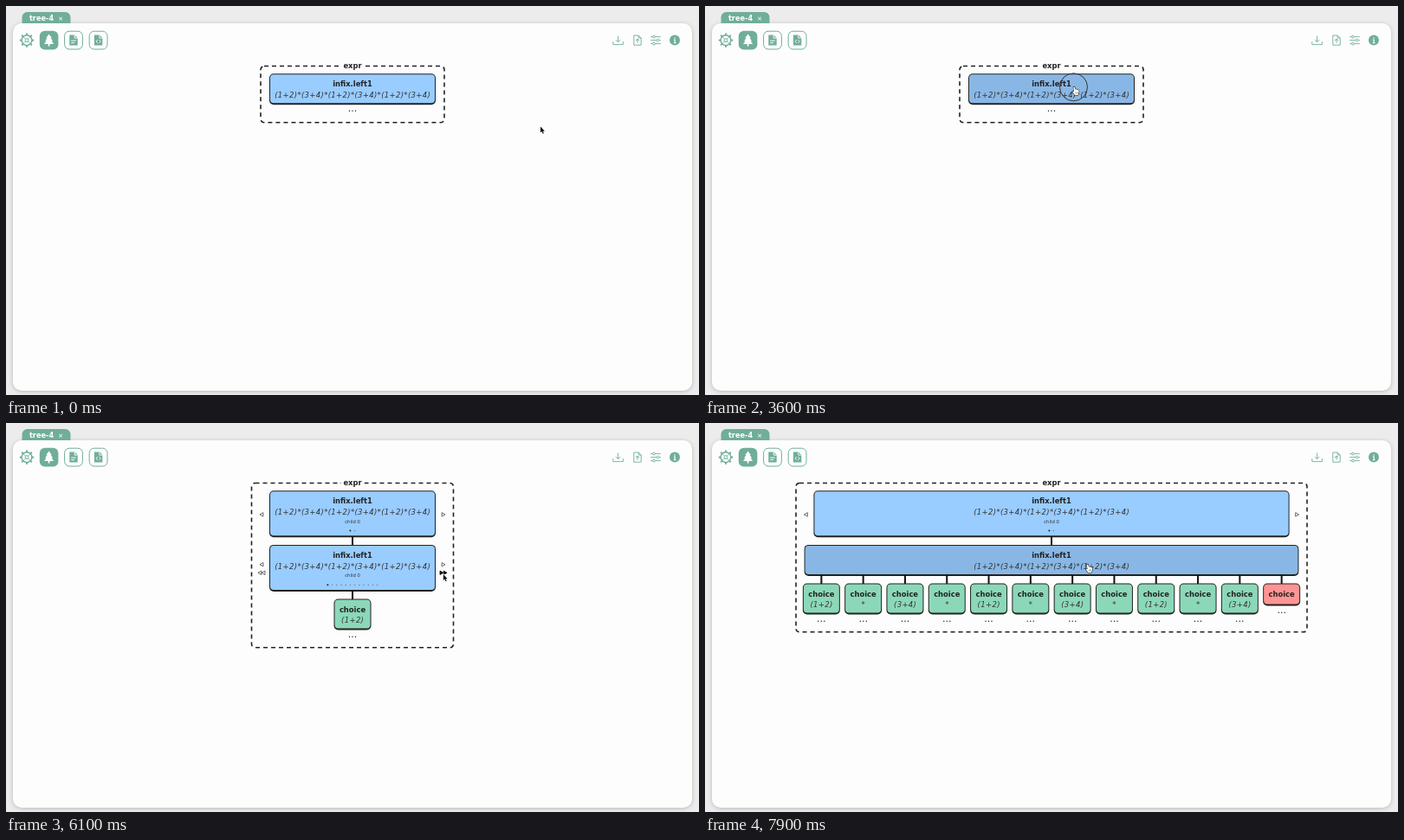
An HTML page with a canvas that plays this animation: 800 by 450 pixels, repeating every 8000 ms.

```html
<!DOCTYPE html>
<html lang="en">
<head>
<meta charset="utf-8">
<title>Parse tree viewer</title>
<style>
html, body { margin: 0; width: 100%; height: 100%; overflow: hidden; background: #ececec; }
canvas { display: block; }
</style>
</head>
<body>
<canvas id="stage" width="800" height="450"></canvas>
<script>
const c = document.getElementById('stage').getContext('2d');
const GREEN = '#70ae99', PAPER = '#fdfdfd', INK = '#222';
const BLUE = '#99ccff', MINT = '#8bd8b9', RED = '#ff9494';
const EXPR = Array(3).fill('(1+2)*(3+4)').join('*');
const LOOP = 8000, TICK = 100, GAP = 8.6;

// Tree state from each time on: chosen child of the outer and of the inner node.
const states = [
  [0, {}],
  [1000, { outer: 0 }],
  [1800, { outer: 1 }],
  [2900, {}],
  [3700, { outer: 0 }],
  [4600, { outer: 0, inner: 0 }],
  [6300, { outer: 0, inner: 5 }],
  [6800, { outer: 0, inner: 10 }],
  [7700, { outer: 0, all: true }]
];
const clicks = [900, 1700, 2800, 3600, 4500, 6200, 6700, 7600];

// Pointer moves: start, end, x, y
const moves = [
  [200, 850, 425.5, 93.5],
  [1100, 1500, 504.8, 105],
  [2400, 2800, 425.5, 93.5],
  [3700, 4400, 422.7, 156],
  [5000, 5800, 504.8, 175],
  [6900, 7500, 441, 163.5]
];

function pointerAt(t) {
  let x = 617, y = 139.5;
  for (const [start, end, toX, toY] of moves) {
    const k = Math.min(1, Math.max(0, (t - start) / (end - start)));
    const e = k * k * (3 - 2 * k);
    x += (toX - x) * e;
    y += (toY - y) * e;
  }
  return { x, y };
}

function box(x, y, w, h, r, fill) {
  c.beginPath();
  c.roundRect(x, y, w, h, r);
  c.fillStyle = fill;
  c.fill();
}

function text(s, x, y, font, color = INK, spacing = 0) {
  c.font = font + ' "DejaVu Sans", Verdana, sans-serif';
  c.textAlign = 'center';
  c.letterSpacing = spacing + 'px';
  c.fillStyle = color;
  c.fillText(s, x + spacing / 2, y);
}

function trace(d, color, width = 1) {
  c.strokeStyle = color;
  c.lineWidth = width;
  c.stroke(new Path2D(d));
}

function shape(d, color) {
  c.fillStyle = color;
  c.fill(new Path2D(d));
}

function at(x, y, draw) {
  c.save();
  c.translate(x, y);
  draw();
  c.restore();
}

function disc(x, y, r, color) {
  c.beginPath();
  c.arc(x, y, r, 0, 7);
  c.fillStyle = color;
  c.fill();
}

function ring(x, y, r, color, width) {
  c.beginPath();
  c.arc(x, y, r, 0, 7);
  c.strokeStyle = color;
  c.lineWidth = width;
  c.stroke();
}

function gear() {
  ring(0, 0, 5.9, GREEN, 1.4);
  ring(0, 0, 1.9, GREEN, 1);
  for (let i = 0; i < 8; i++) {
    c.save();
    c.rotate(i * Math.PI / 4);
    trace('M6 0H8.2', GREEN, 2);
    if (i % 2) trace('M2 0H6', GREEN, .8);
    c.restore();
  }
}

function button(x) {
  c.beginPath();
  c.roundRect(x - 10.4, 29.2, 20.8, 20.8, 5.5);
  c.strokeStyle = GREEN;
  c.lineWidth = 1;
  c.stroke();
}

const PAGE = 'M-4.7 -6H1.4L4.7 -2.7V6H-4.7Z';

function chrome() {
  c.fillStyle = '#ececec';
  c.fillRect(0, 0, 800, 450);
  c.save();
  c.shadowColor = 'rgba(0,0,0,.22)';
  c.shadowBlur = 5;
  c.shadowOffsetY = 1;
  box(8, 20, 784, 425, 10, PAPER);
  c.restore();
  box(18.5, 7, 56, 13, [6, 6, 0, 0], GREEN);
  text('tree-4', 41, 17, 'bold 8.2px', '#fff');
  text('×', 63.2, 17, 'bold 7.5px', '#e4f1ec');

  at(24, 39.6, gear);
  box(38.8, 28.8, 21.6, 21.6, 6, GREEN);
  at(49.6, 39.6, () => shape('M0 -7L3.3 -2.7H2L4.5 .8H3L5.6 4.5H.9V7H-.9V4.5H-5.6L-3 .8H-4.5L-2 -2.7H-3.3Z', '#fff'));
  button(78);
  at(78, 39.6, () => {
    shape(PAGE, GREEN);
    trace('M1.2 -6V-2.5H4.7M-2.8 .5H2.8M-2.8 3H1.2', PAPER, 1);
  });
  button(106.6);
  at(106.6, 39.6, () => {
    shape(PAGE, GREEN);
    trace('M1.2 -6V-2.5H4.7M-.8 -.6L-2.6 1.3L-.8 3.2M.8 -.6L2.6 1.3L.8 3.2', PAPER, .9);
  });

  at(706.6, 39.6, () => trace('M-5.8 1.5V5H5.8V1.5M0 -5V2M-2.6 -.5L0 2.1L2.6 -.5', GREEN, .9));
  at(729, 39.6, () => {
    trace('M-4.2 -5.6H1.2L4.2 -2.6V5.6H-4.2ZM1.2 -5.6V-2.6H4.2', GREEN, .9);
    trace('M0 3V-1.4M-1.9 .4L0 -1.5L1.9 .4', GREEN, 1);
  });
  at(750, 39.6, () => {
    trace('M-5.8 -4H5.8M-5.8 0H5.8M-5.8 4H5.8', GREEN, .9);
    for (const [x, y] of [[-2, -4], [2.5, 0], [-2, 4]]) {
      disc(x, y, 1.6, PAPER);
      ring(x, y, 1.4, GREEN, .9);
    }
  });
  disc(772, 39.6, 6, GREEN);
  at(772, 39.6, () => trace('M0 -3.4V-1.9M-1 -.5H.2V3M-1.2 3H1.4', '#fff', 1.1));
}

function frame(halfWidth, bottom) {
  const top = 69.5;
  c.save();
  c.beginPath();
  c.roundRect(400 - halfWidth, top, 2 * halfWidth, bottom - top, 4);
  c.setLineDash([5, 4]);
  c.strokeStyle = INK;
  c.lineWidth = 1.6;
  c.stroke();
  c.restore();
  c.fillStyle = PAPER;
  c.fillRect(387, 67, 26.5, 5);
  text('expr', 400, 72, 'bold 8.4px');
}

const link = (x, y) => trace(`M${x} ${y - 1}V${y + GAP + 1}`, '#111', 2);
const more = (x, y) => text('...', x, y + 8, '11px');

// Draws a node and returns its bottom edge.
function node(p, x, y, half, fill, name, code, pick, count) {
  const paged = pick !== undefined;
  const h = paged ? 54 : code ? 36 : 26;
  const hover = Math.abs(p.x - x) < half && p.y > y && p.y < y + h;
  if (hover) p.hand = true;
  box(x - half, y, 2 * half, h, 5, INK);
  box(x - half + 1, y + 1, 2 * half - 2, h - 3, 4, fill);
  if (hover) box(x - half + 1, y + 1, 2 * half - 2, h - 3, 4, 'rgba(0,0,0,.1)');
  text(name, x, y + 15, 'bold 8.4px');
  if (code) text(code, x, y + 27.8, 'italic 8.5px', '#333', .32);
  if (paged) {
    text('child ' + pick, x, y + 37.4, '5.3px', '#333');
    for (let i = 0; i < count; i++) {
      disc(x + (i - (count - 1) / 2) * 5.2, y + 46.3, i <= pick ? 1 : .55, i <= pick ? INK : '#456');
    }
    pager(p, x, y, half, count);
  }
  return y + h;
}

function pager(p, x, y, half, count) {
  const long = count > 5;
  const rows = long ? [[1, y + 22.8], [2, y + 32.4]] : [[1, y + 27.6]];
  for (const side of [-1, 1]) {
    for (const [marks, my] of rows) {
      const mx = x + side * (half + 9);
      const over = Math.abs(p.x - mx) < 6 && Math.abs(p.y - my) < 4.8;
      for (let i = 0; i < marks; i++) {
        at(mx + (i - (marks - 1) / 2) * 4.2, my, () => {
          c.scale(side, 1);
          const d = 'M-1.9 -2.2L2 0L-1.9 2.2Z';
          if (over) shape(d, '#111');
          trace(d, over ? '#111' : '#444', .8);
        });
      }
    }
  }
}

function choice(p, i, x, y) {
  const code = i === 11 ? '' : i % 2 ? '*' : i % 4 ? '(3+4)' : '(1+2)';
  const bottom = node(p, x, y, 21.5, code ? MINT : RED, 'choice', code);
  more(x, bottom);
  return bottom;
}

function tree(p, { outer, inner, all }) {
  const open = outer !== undefined;
  const name = 'infix.left1';
  let y = 78.3, tail = 20.5;
  frame(all ? 295 : open ? 116.5 : 106, frameBottom(outer, inner, all));
  y = node(p, 400, y, all ? 274.6 : 96, BLUE, name, EXPR, outer, 2);
  if (!open) return more(400, y);
  link(400, y);
  y += GAP;
  if (outer === 1) return node(p, 400, y, 21.5, RED, 'choice');
  y = node(p, 400, y, all ? 285.4 : 96, BLUE, name, EXPR, inner, 12);
  if (all) {
    for (let i = 0; i < 12; i++) {
      const x = 400 + (i - 5.5) * 48.3;
      link(x, y);
      choice(p, i, x, y + GAP);
    }
  } else if (inner !== undefined) {
    link(400, y);
    choice(p, inner, 400, y + GAP);
  } else {
    more(400, y);
  }
}

function frameBottom(outer, inner, all) {
  if (outer === undefined) return 134.7;
  if (outer === 1) return 179.8;
  return all ? 241.8 : inner === undefined ? 197.3 : 259.8;
}

function pointer({ x, y, hand }) {
  at(x, y, () => {
    const d = hand
      ? 'M-.3 .4Q.6 -.6 1.3 .4L2 3L3 2.7L3.8 3.2L4.6 3L5.2 3.8Q6.2 3.6 6.2 4.8L5.9 7.6L5 9.5H1.5L-1 6.3Q-1.6 5 -.2 5.2L.6 5.7Z'
      : 'M0 0V7L1.6 5.6L2.7 8.2L3.9 7.7L2.8 5.2H4.9Z';
    c.lineJoin = 'round';
    trace(d, hand ? '#222' : '#fff', hand ? 1.1 : 1.2);
    shape(d, hand ? '#fff' : '#111');
    if (hand) trace('M2.3 6V8M3.6 6V8M4.8 6V8', '#555', .5);
  });
}

function draw(now) {
  const t = Math.floor(now % LOOP / TICK) * TICK;
  const p = pointerAt(t);
  chrome();
  tree(p, states.findLast(([start]) => start <= t)[1]);
  if (clicks.includes(t)) ring(p.x, p.y + .3, 16, '#333', 1);
  pointer(p);
}

const begin = performance.now();
function tick() {
  draw(performance.now() - begin);
  requestAnimationFrame(tick);
}
tick();
</script>
</body>
</html>
```
